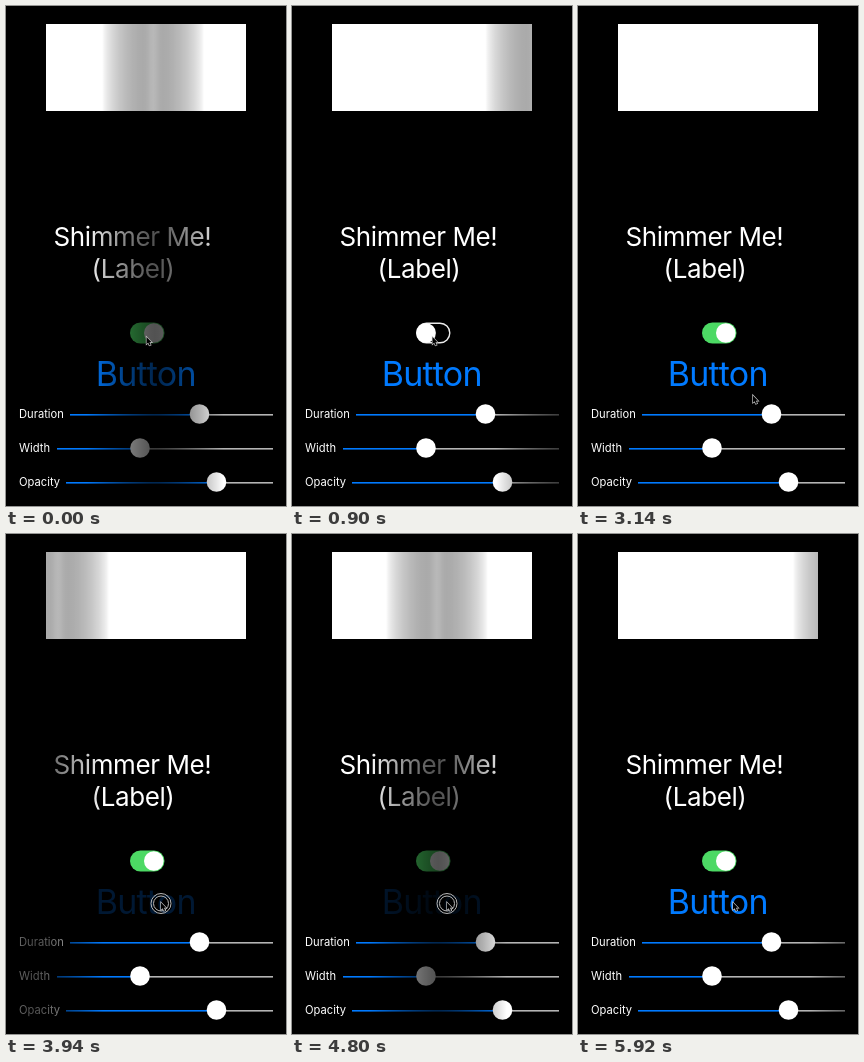
An HTML page with a canvas for the animation above (5940 ms loop, 280 by 500 pixels).

```html
<!DOCTYPE html>
<html lang="en">
<head>
<meta charset="utf-8">
<title>Shimmer</title>
<style>
html, body { margin: 0; width: 100%; height: 100%; overflow: hidden; background: #000; }
canvas { display: block; width: 280px; height: 500px; }
</style>
</head>
<body>
<canvas id="stage"></canvas>
<script>
const LOOP = 5.94, W = 280, H = 500;
const BLUE = '#007aff';
const FONT = 'Inter, Roboto, sans-serif';
const canvas = document.getElementById('stage');
const ctx = canvas.getContext('2d');
const ratio = window.devicePixelRatio || 1;
canvas.width = W * ratio;
canvas.height = H * ratio;
ctx.scale(ratio, ratio);

const clamp = v => Math.min(1, Math.max(0, v));
const ramp = (t, start, end) => clamp((t - start) / (end - start));
const mix = (a, b, p) => a + (b - a) * p;

// Band position as a fraction of the shimmering view's width
function sweep(t) {
  const lead = 0.6, period = 2.603, speed = 0.54;
  return (lead + 0.535 + speed * t) % period - lead;
}

function rect(x, y, w, h, color) {
  ctx.fillStyle = color;
  ctx.fillRect(x, y, w, h);
}

function pill(x, y, w, h, color) {
  ctx.beginPath();
  ctx.roundRect(x, y, w, h, h / 2);
  ctx.fillStyle = color;
  ctx.fill();
}

function text(str, x, y, size, color, align = 'center', spacing = 0) {
  ctx.font = `400 ${size}px ${FONT}`;
  ctx.letterSpacing = spacing + 'px';
  ctx.textAlign = align;
  ctx.fillStyle = color;
  ctx.fillText(str, x, y);
}

// Darkens a view with a soft band; profile maps -1..1 to black alpha.
function shimmer(x, y, w, h, progress, halfWidth, profile) {
  const center = x + w * progress, half = w * halfWidth, steps = 40;
  const band = ctx.createLinearGradient(center - half, 0, center + half, 0);
  for (let i = 0; i <= steps; i++) {
    band.addColorStop(i / steps, `rgba(0,0,0,${profile(i / steps * 2 - 1).toFixed(3)})`);
  }
  rect(x, y, w, h, band);
}

const imageProfile = d => 0.35 * (1 - d * d) ** 0.8 - 0.07 * Math.exp(-((d / 0.12) ** 2));
const controlProfile = d => 0.68 * (1 - Math.abs(d) ** 1.4);

function drawSlider(label, y, start, thumb) {
  text(label, 13, y + 4.3, 11.2, '#fff', 'left');
  rect(start, y, thumb - start, 1.6, BLUE);
  rect(thumb, y, 267 - thumb, 1.6, '#b4b4b4');
  pill(thumb - 9.8, y - 9.8, 19.6, 19.6, '#fff');
}

function drawSwitch(on) {
  pill(124, 316.5, 34.5, 21, `rgba(76,217,100,${on})`);
  ctx.beginPath();
  ctx.roundRect(124.7, 317.2, 33.1, 19.6, 9.8);
  ctx.strokeStyle = `rgba(235,235,235,${1 - on})`;
  ctx.lineWidth = 1.4;
  ctx.stroke();
  pill(mix(124.3, 138, on), 317.2, 19.6, 19.6, '#fff');
}

function drawPointer(t) {
  // Leaves the switch, dips below the button, then returns to press it
  const leave = ramp(t, 1.95, 2.45), rise = ramp(t, 2.5, 2.75), press = ramp(t, 3.14, 3.45);
  const x = mix(mix(140.5, 175, leave), 155, press);
  const y = mix(mix(mix(331, 398, leave), 389.5, rise), 368.5, press);
  ctx.save();
  ctx.translate(x, y);
  const arrow = new Path2D('M0 0V7.2L1.7 5.8L2.9 8.5L4.2 7.9L3 5.3H5.1Z');
  ctx.strokeStyle = '#ccc';
  ctx.lineWidth = 1.3;
  ctx.stroke(arrow);
  ctx.fillStyle = '#000';
  ctx.fill(arrow);
  ctx.restore();
}

function drawTouch(x, y) {
  ctx.strokeStyle = '#b8b8b8';
  ctx.lineWidth = 1;
  for (const r of [7.5, 10]) {
    ctx.beginPath();
    ctx.arc(x, y, r, 0, Math.PI * 2);
    ctx.stroke();
  }
}

function draw(t) {
  const progress = sweep(t);
  const on = 1 - ramp(t, 0.06, 0.3) + ramp(t, 1.82, 1.98);
  const pressed = ramp(t, 3.52, 3.58) - ramp(t, 5.56, 5.8);

  rect(0, 0, W, H, '#000');
  rect(40, 18, 200, 87, '#fff');
  shimmer(40, 18, 200, 87, progress, 0.255, imageProfile);

  text('Shimmer Me!', 126.5, 240, 26, '#fff', 'center', -0.4);
  text('(Label)', 127, 272, 26, '#fff', 'center', -0.4);
  drawSwitch(on);
  ctx.globalAlpha = mix(1, 0.2, pressed);
  text('Button', 139.7, 380.3, 34, BLUE, 'center', -0.8);
  ctx.globalAlpha = 1;
  drawSlider('Duration', 408, 64, 193.5);
  drawSlider('Width', 442, 51, 134);
  drawSlider('Opacity', 476, 60, 210.5);
  shimmer(13, 200, 254, 300, progress, 0.27, controlProfile);

  if (t >= 3.5 && t < 5.6) drawTouch(155, 369.5);
  drawPointer(t);
}

const begin = performance.now();
function frame() {
  draw((performance.now() - begin) / 1000 % LOOP);
  requestAnimationFrame(frame);
}
frame();
</script>
</body>
</html>
```
